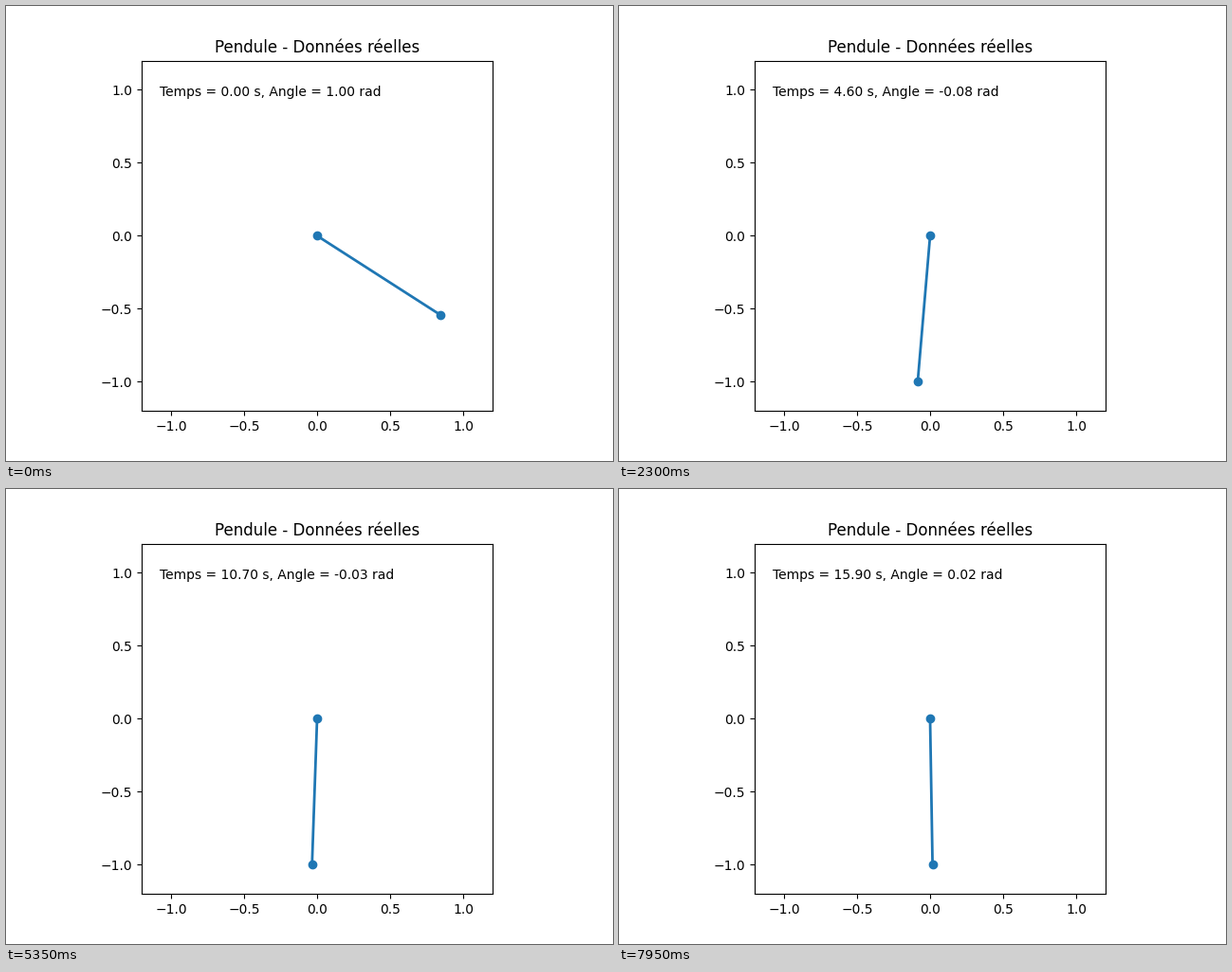
Write a matplotlib script that moves like this. It is 640 px wide and 480 px high and loops after 8 s.

```python
import numpy as np
import matplotlib.pyplot as plt
from matplotlib.animation import FuncAnimation

FRAMES = 160
INTERVAL = 50      # ms per frame
DT = 0.1           # simulated seconds per frame

THETA0 = 1.0       # initial angle, rad
DAMPING = 0.25     # decay rate, 1/s
OMEGA = np.sqrt(9.81)


def angle(t):
    return THETA0 * np.exp(-DAMPING * t) * np.cos(OMEGA * t)


fig, ax = plt.subplots(figsize=(6.4, 4.8), dpi=100)
ax.set_xlim(-1.2, 1.2)
ax.set_ylim(-1.2, 1.2)
ax.set_aspect("equal")
ax.set_title("Pendule - Données réelles")

rod, = ax.plot([], [], "o-", lw=2)
label = ax.text(0.05, 0.9, "", transform=ax.transAxes)


def update(frame):
    t = frame * DT
    theta = angle(t)
    rod.set_data([0, np.sin(theta)], [0, -np.cos(theta)])
    label.set_text(f"Temps = {t:.2f} s, Angle = {theta:.2f} rad")
    return rod, label


def init():
    return update(0)


anim = FuncAnimation(fig, update, frames=FRAMES, init_func=init,
                     interval=INTERVAL, repeat=True, repeat_delay=0)
plt.show()
```
